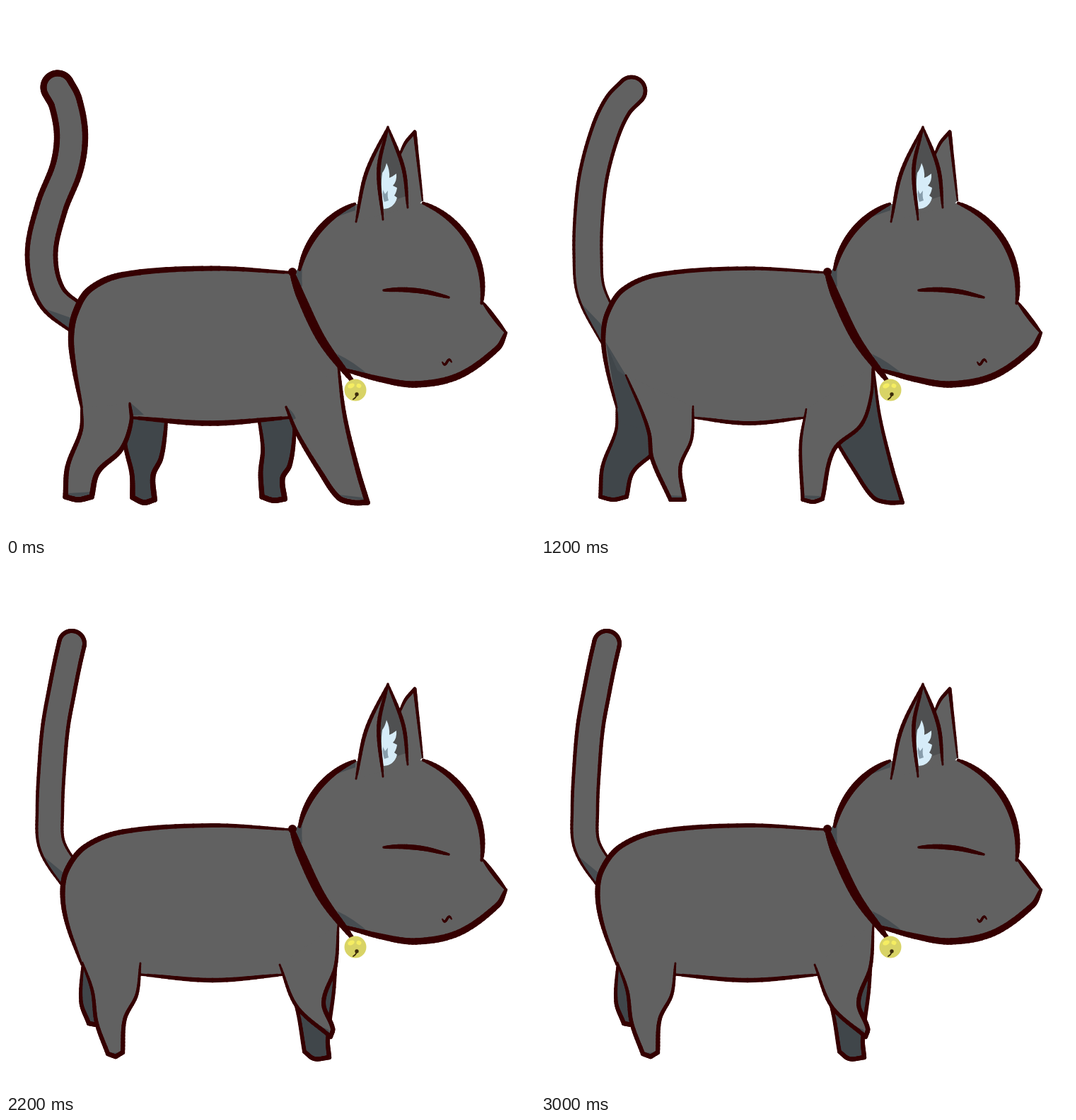
An HTML page with a canvas that plays this animation: 748 by 748 pixels, repeating every 3.2 s.

```html
<!DOCTYPE html>
<html lang="en">
<head>
<meta charset="utf-8">
<title>Walking cat</title>
<style>
html, body { margin: 0; width: 100%; height: 100%; overflow: hidden; background: #fff; }
canvas { display: block; width: 748px; height: 748px; }
</style>
</head>
<body>
<canvas id="stage" width="748" height="748"></canvas>
<script>
const ctx = document.getElementById('stage').getContext('2d');
const FUR = '#616161', FAR = '#40464a', SHADE = '#474d51', INK = '#350001';
const STEP = 200;

const dir = (a, b) => {
  const x = b[0] - a[0], y = b[1] - a[1], d = Math.hypot(x, y) || 1;
  return [x / d, y / d, d];
};

// Smooth curve through x, y pairs; sharp turns stay corners.
function curve(...xy) {
  const p = [];
  for (let i = 0; i < xy.length; i += 2) p.push([xy[i], xy[i + 1]]);
  const tangent = (i, side) => {
    const before = p[i - 1] && dir(p[i - 1], p[i]);
    const after = p[i + 1] && dir(p[i], p[i + 1]);
    if (!before || !after) return before || after;
    const turn = before[0] * after[0] + before[1] * after[1];
    if (turn < .72) return side < 0 ? before : after;
    return dir(p[i - 1], p[i + 1]);
  };
  const out = [p[0]];
  for (let i = 0; i + 1 < p.length; i++) {
    const a = p[i], b = p[i + 1], d = dir(a, b)[2];
    const m = tangent(i, 1), n = tangent(i + 1, -1);
    for (let s = 1; s <= 10; s++) {
      const t = s / 10, u = t * t, v = u * t;
      out.push([0, 1].map(k =>
        (2 * v - 3 * u + 1) * a[k] + (v - 2 * u + t) * d * m[k] +
        (3 * u - 2 * v) * b[k] + (v - u) * d * n[k]));
    }
  }
  return out;
}

const trace = (n, at) => Array.from({ length: n + 1 }, (_, i) => at(i / n));

const arc = (x, y, r, from, to) => trace(30, t => {
  const a = from + (to - from) * t;
  return [x + r * Math.cos(a), y + r * Math.sin(a)];
});

function fill(color, ...lines) {
  ctx.fillStyle = color;
  ctx.beginPath();
  lines.flat().forEach(q => ctx.lineTo(q[0], q[1]));
  ctx.fill();
}

// Brush line that swells in the middle.
function ink(line, weight) {
  ctx.strokeStyle = INK;
  ctx.lineCap = 'round';
  for (let i = 1; i < line.length; i++) {
    const t = (i - .5) / (line.length - 1);
    ctx.lineWidth = weight * (.35 + .65 * Math.sqrt(Math.sin(Math.PI * t)));
    ctx.beginPath();
    ctx.moveTo(...line[i - 1]);
    ctx.lineTo(...line[i]);
    ctx.stroke();
  }
}

function patch(color, d) {
  ctx.fillStyle = color;
  ctx.fill(new Path2D(d));
}

function dot(color, x, y, rx, ry = rx, turn = 0) {
  ctx.fillStyle = color;
  ctx.beginPath();
  ctx.ellipse(x, y, rx, ry, turn, 0, 7);
  ctx.fill();
}

const stretchedHind = curve(107,568, 106,600, 87,651, 84,694, 102,698, 121,694, 130,659, 163,627, 177,588, 175,562);
const stretchedFront = curve(396,567, 412,605, 445,660, 470,695, 490,702, 511,702, 497,655, 479,580, 470,510);
const plantedHind = curve(108,565, 122,605, 128,650, 144,694, 155,698, 165,692, 168,645, 185,610, 190,566);
const plantedFront = curve(387,568, 410,625, 422,691, 436,701, 457,699, 455,672, 464,600, 469,510);
const liftedHind = curve(109,560, 106,620, 117,651, 128,653, 165,624, 186,566);
const liftedFront = curve(387,568, 411,627, 459,670, 462,658, 449,621, 466,570, 470,510);

const stride = {
  tail: curve(106,446, 64,410, 50,352, 64,285, 86,228, 92,182, 84,136, 73,115),
  girth: 20, tailWeight: 9, weight: 9, rump: 0, belly: [177, 400],
  near: [stretchedHind, stretchedFront],
  far: [
    curve(175,575, 168,614, 178,662, 179,695, 195,702, 210,698, 208,664, 219,640, 225,605, 227,575),
    curve(356,575, 363,625, 360,660, 362,694, 378,699, 394,697, 391,668, 401,650, 407,615, 408,575)
  ],
  shade: 'M176 561Q188 571 195 578L180 579ZM397 567Q406 573 410 583L404 586ZM87 689L121 687L119 693L88 694ZM470 691L504 695L507 699L480 696Z'
};

const gather = {
  tail: curve(104,470, 71,405, 66,350, 68,290, 75,235, 92,175, 109,140, 128,120),
  girth: 19.5, tailWeight: 5.5, weight: 7, rump: -4, belly: [215, 374],
  near: [
    curve(120,522, 142,572, 153,605, 157,640, 183,698, 203,698, 197,652, 213,612, 215,566),
    curve(375,570, 367,620, 370,698, 385,701, 398,697, 414,628, 453,592, 467,550, 469,510)
  ],
  far: [stretchedHind, stretchedFront],
  flank: 'M92 476L121 524L152 600L112 590L107 566Z',
  shade: 'M91 475L121 524L108 515ZM181 692L201 693L202 697L184 697ZM371 692L397 693L395 697L372 697Z'
};

const passing = {
  tail: curve(98,452, 65,400, 62,350, 65,285, 70,230, 79,180, 87,140, 93,114),
  girth: 18, tailWeight: 6, weight: 7.5, rump: -12, belly: [190, 394]
};
const nearPlanted = {
  ...passing, near: [plantedHind, liftedFront], far: [liftedHind, plantedFront],
  shade: 'M143 690Q154 695 164 690L162 695Q154 698 146 695ZM434 651L456 660L458 667Z'
};
const nearLifted = {
  ...passing, near: [liftedHind, plantedFront], far: [plantedHind, liftedFront],
  shade: 'M113 645L129 648L126 652L118 650ZM424 692L455 694L455 698L436 698Z'
};

const poses = [stride, nearLifted, gather, nearPlanted];

function drawTail({ tail, girth, tailWeight }) {
  const normal = tail.map((q, i) => {
    const [x, y] = dir(tail[Math.max(0, i - 1)], tail[Math.min(tail.length - 1, i + 1)]);
    return [y, -x];
  });
  const side = r => tail.map((q, i) => [q[0] + r * normal[i][0], q[1] + r * normal[i][1]]);
  const left = side(girth), right = side(-girth).reverse();
  const tip = tail[tail.length - 1], n = normal[tail.length - 1];
  const turn = Math.atan2(n[1], n[0]);
  const outline = [...left, ...arc(...tip, girth, turn, turn + Math.PI), ...right];
  fill(FUR, outline);
  fill(SHADE, left.slice(0, 10), [tail[0]]);
  ink(outline, tailWeight);
}

function drawBody({ rump, weight, belly: [x0, x1], near, far, flank, shade }) {
  const back = curve(404,377, 290,371, 165,380, 118 + rump / 2,401, 98 + rump,434,
    92 + rump,468, 96 + rump * .8,510, 107,568);
  const belly = curve(x0,582, (x0 + x1) / 2,590, x1,582);
  far.forEach(leg => { fill(FAR, leg); ink(leg, weight * .85); });
  fill(FUR, back, belly, [[460, 560], [470, 505]]);
  if (flank) patch(FAR, flank);
  ink(back, weight);
  ink(belly, weight * .85);
  near.forEach(leg => fill(FUR, leg));
  patch(SHADE, shade);
  near.forEach(leg => ink(leg, weight * .85));
}

function drawHead() {
  const farEar = curve(556,212, 565,193, 578,178, 581,205, 589,275);
  fill(FUR, farEar, [[575, 290], [555, 290]]);
  ink(farEar, 5);

  const nape = arc(543, 401, 131, 3.36, 4.32);
  const skull = arc(543, 401, 131, 5.08, 6.43);
  const snout = curve(675,420, 690,440, 707,462);
  const jaw = curve(707,462, 695,484, 640,523, 580,535, 530,528, 478,514);
  fill(FUR, nape, skull, snout, jaw, curve(478,514, 432,443, 405,376));
  patch(SHADE, 'M455 304Q475 287 494 280L494 289Q472 296 455 304Z');
  patch(SHADE, 'M410 376L421 356Q417 376 419 396L413 400Z');
  patch(SHADE, 'M468 492Q492 503 514 523L480 516Z');
  ink(nape, 9);
  ink(skull, 9);
  ink(snout, 6);
  ink(jaw, 9.5);

  const ear = [curve(495,305, 509,237, 540,171), curve(540,171, 562,230, 568,285)];
  const fold = curve(540,172, 527,230, 533,302);
  fill(FUR, ...ear);
  fill('#4f5051', fold.slice(0, 18), ear[1].slice(0, 18).reverse());
  patch('#d6ecf8', 'M538 222Q543 232 542 243Q547 241 552 237Q553 248 547 254L553 257Q552 264 549 268L553 271Q549 286 534 287Q529 254 532 236Q536 231 538 222Z');
  patch('#879dab', 'M533 260L536 266L540 261Q539 270 541 275L535 277Q532 270 533 260Z');
  [...ear, fold].forEach(l => ink(l, 5.5));

  ink(curve(534,402, 560,401, 592,404, 626,412), 7);
  ink(trace(14, t => [617 + 13 * t, 503.5 + 3.5 * Math.sin(2 * Math.PI * t)]), 3.5);
}

function drawCollar() {
  dot(INK, 405, 376, 6);
  ink(curve(404,376, 417,411, 447,473, 488,528), 13);
  dot('#d8d366', 494, 543, 15.5);
  dot('#f5ed62', 488, 537, 5, 3.2, -.4);
  dot('#f5ed62', 499, 537, 3.5, 3, .4);
  dot('#3c2c0c', 496, 549, 2.7);
  ctx.strokeStyle = '#3c2c0c';
  ctx.lineWidth = 1.8;
  ctx.stroke(new Path2D('M496 549Q495 554 491 556'));
}

function draw(pose) {
  ctx.fillStyle = '#fff';
  ctx.fillRect(0, 0, 748, 748);
  drawTail(pose);
  drawBody(pose);
  drawHead();
  drawCollar();
}

let shown = -1;
function tick() {
  const n = Math.floor(performance.now() / STEP) % poses.length;
  if (n !== shown) draw(poses[shown = n]);
  requestAnimationFrame(tick);
}
tick();
</script>
</body>
</html>
```
